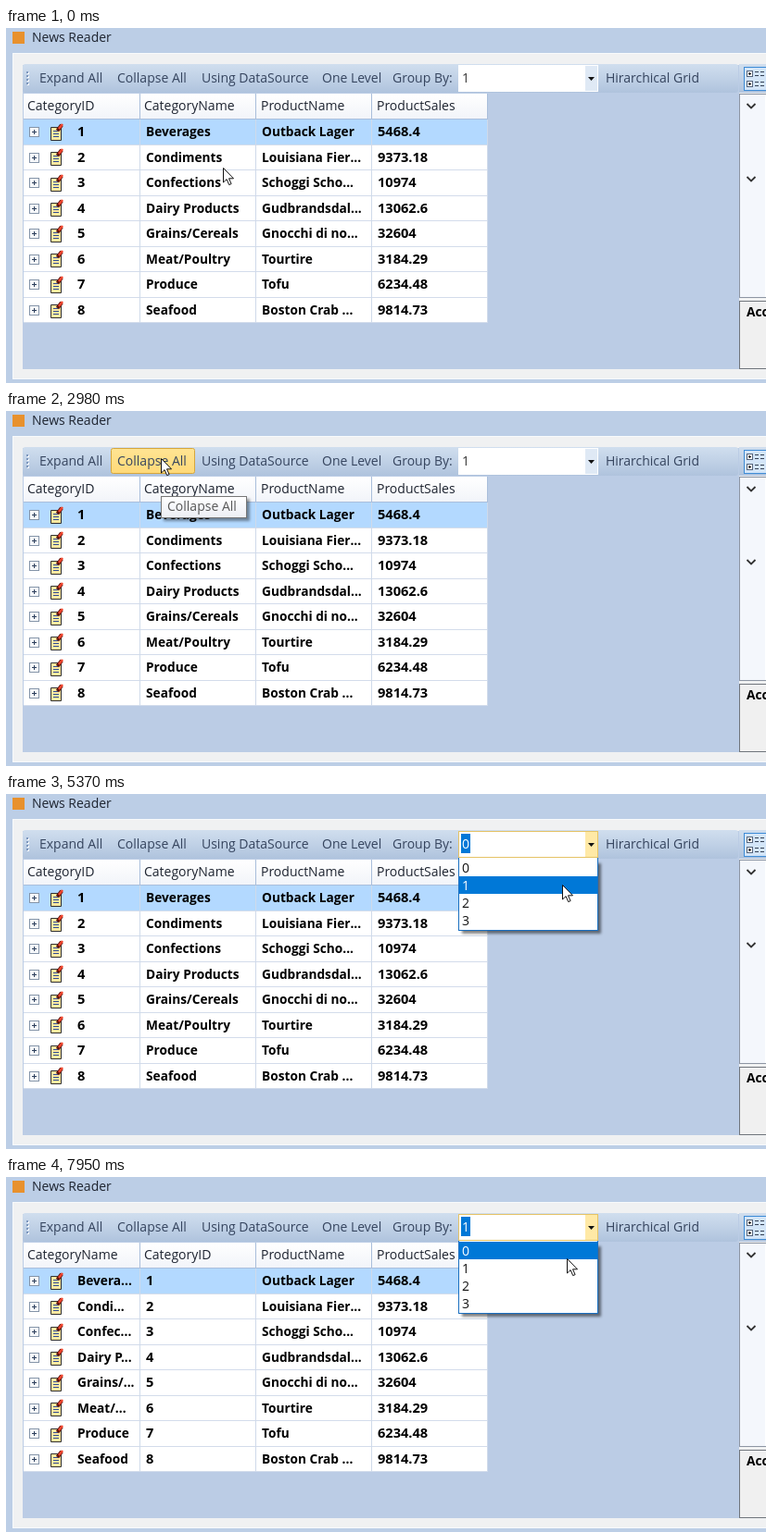
Animation of 820 by 384 pixels, one loop 8 s. Source, as an HTML page:

```html
<!DOCTYPE html>
<html lang="en">
<head>
<meta charset="utf-8">
<title>News Reader</title>
<style>
  html, body { margin: 0; width: 100%; height: 100%; overflow: hidden; background: #bccee6; }
  svg { display: block; }
  text { font: 14px "Open Sans", "Noto Sans", sans-serif; fill: #111; white-space: pre; }
  .tool { fill: #35445e; }
  .head { fill: #1e2430; }
  .bold { font-weight: 700; font-size: 13.7px; fill: #000; }
  .bold.num { font-size: 14.6px; }
  .num { font-size: 13.7px; }
  .tip { fill: #575757; }
  rect { shape-rendering: crispEdges; }
  .soft { shape-rendering: auto; }
</style>
</head>
<body>
<svg id="stage" width="820" height="384" viewBox="0 0 820 384">
  <defs>
    <linearGradient id="bar" x2="0" y2="1">
      <stop stop-color="#d0deee"/><stop offset=".5" stop-color="#c0d1e6"/><stop offset="1" stop-color="#afc3dd"/>
    </linearGradient>
    <linearGradient id="headFill" x2="0" y2="1">
      <stop stop-color="#fff"/><stop offset="1" stop-color="#f1f4f9"/>
    </linearGradient>
    <linearGradient id="hover" x2="0" y2="1">
      <stop stop-color="#fdf0bd"/><stop offset="1" stop-color="#fadf86"/>
    </linearGradient>
    <linearGradient id="pressed" x2="0" y2="1">
      <stop stop-color="#ffe493"/><stop offset="1" stop-color="#ffd978"/>
    </linearGradient>
    <linearGradient id="tipFill" x2="0" y2="1">
      <stop stop-color="#fff"/><stop offset="1" stop-color="#eceef4"/>
    </linearGradient>
    <filter id="blur" x="-10%" y="-50%" width="120%" height="200%"><feGaussianBlur stdDeviation="1.5"/></filter>
    <clipPath id="gridClip"><rect x="18" y="70" width="773" height="299"/></clipPath>
    <clipPath id="listClip"><rect x="480" y="69" width="180" height="90"/></clipPath>
    <g id="note">
      <path d="M2.5 5.5h11v14h-11z" fill="#ffe9a0" stroke="#2e2e2e"/>
      <path d="M5 9.5h5M5 12.5h6M5 15.5h6" stroke="#2f4d94"/>
      <path d="M9.5 9l4.5-6" stroke="#5c130b" stroke-width="4"/>
      <path d="M11 7l4-5" stroke="#f0452e" stroke-width="2.6"/>
    </g>
    <g id="noteGray">
      <path d="M2.5 5.5h11v14h-11z" fill="#f4f4f4" stroke="#2e2e2e"/>
      <path d="M5 9.5h5M5 12.5h6M5 15.5h6" stroke="#666"/>
      <path d="M9.5 9l4.5-6" stroke="#222" stroke-width="4"/>
      <path d="M11 7l4-5" stroke="#666" stroke-width="2"/>
    </g>
  </defs>
</svg>
<script>
const LOOP = 8000;
const ROW_H = 27.5;
const LIST_H = 80;
const stage = document.getElementById('stage');

const rect = (x, y, w, h, fill, more = '') =>
  `<rect x="${x}" y="${y}" width="${w}" height="${h}" fill="${fill}" ${more}/>`;
const frame = (x, y, w, h, fill, stroke, more = '') =>
  rect(x + .5, y + .5, w - 1, h - 1, fill, `stroke="${stroke}" ${more}`);
const text = (x, y, s, cls = '') => `<text x="${x}" y="${y}" class="${cls}">${s}</text>`;
const path = (d, stroke, width = 1, fill = 'none') =>
  `<path d="${d}" stroke="${stroke}" stroke-width="${width}" fill="${fill}"/>`;
const group = (id, body, more = '') => `<g id="${id}" ${more}>${body}</g>`;

// Toolbar buttons: label, text x, left and right edge
const buttons = [
  ['Expand All', 36, 29, 113],
  ['Collapse All', 120, 113, 204],
  ['Using DataSource', 211, 204, 334],
  ['One Level', 341, 334, 411],
  ['Hirarchical Grid', 647, 640, 757]
];

const products = [
  ['Beverages', 'Outback Lager', 5468.4, 'Bevera...'],
  ['Condiments', 'Louisiana Fier...', 9373.18, 'Condi...'],
  ['Confections', 'Schoggi Scho...', 10974, 'Confec...'],
  ['Dairy Products', 'Gudbrandsdal...', 13062.6, 'Dairy P...'],
  ['Grains/Cereals', 'Gnocchi di no...', 32604, 'Grains/...'],
  ['Meat/Poultry', 'Tourtire', 3184.29, 'Meat/...'],
  ['Produce', 'Tofu', 6234.48, 'Produce'],
  ['Seafood', 'Boston Crab ...', 9814.73, 'Seafood']
];

const drinks = [
  ['Outback Lager', 5468.4], ['Chai', 4887], ['Chang', 7038.55], ['Ipoh Coffee', 11069.9],
  ['Cte de Blaye', 49198.09], ['Florandine verte', 4475.7], ['Laughing Lum...', 910],
  ['Steeleye Stout', 5274.9], ['Waldru Kloster...', 4485.54], ['Lakkalikri', 7379.1]
];

function expander(cx, cy, open) {
  const x = cx - 5, y = Math.round(cy) - 5;
  const bar = `M${x + 3} ${y + 5.5}h5` + (open ? '' : `M${x + 5.5} ${y + 3}v5`);
  return frame(x, y, 11, 11, '#f8fafc', '#8494a8') + path(bar, '#2c3e5c');
}

// Each row: four cell texts, tree depth and expander state; depth 0 is bold
function table(id, heads, rows) {
  const n = rows.length;
  let s = rect(19, 98, 500, n * ROW_H + 1, '#fff') + rect(19, 99, 500, 27, '#b3d9ff');
  s += rect(19, 71, 500, 28, 'url(#headFill)');
  heads.forEach((h, i) => s += text([23, 149, 275, 400][i], 89, h, 'head'));
  rows.forEach(({ cells, depth, open }, i) => {
    const mid = 112.5 + i * ROW_H, base = Math.round(mid + 4.5), dx = depth * 25;
    const bold = depth === 0 ? 'bold' : '';
    s += rect(19, Math.round(98 + (i + 1) * ROW_H), 500, 1, '#d3dceb');
    if (depth < 5) s += expander(30 + dx, mid - .5, open);
    if (depth < 4) s += `<use href="#${bold ? 'note' : 'noteGray'}" x="${46 + dx}" y="${Math.round(mid) - 11}"/>`;
    cells.forEach((c, k) => {
      const cls = bold + (typeof c === 'number' ? ' num' : '');
      s += text(k ? [0, 151, 276, 401][k] : 77 + dx, base, c, cls);
    });
  });
  for (let x = 144; x < 520; x += 125) {
    s += rect(x, 71, 1, 28, '#a9bedb') + rect(x, 99, 1, n * ROW_H, '#cfdaea');
  }
  s += rect(19, 98, 500, 1, '#a9bedb');
  return group(id, s, 'clip-path="url(#gridClip)"');
}

function tooltip(id, x, y, w, label) {
  return group(id,
    rect(x + 3, y + 3, w, 24, '#000', 'class="soft" opacity=".4" filter="url(#blur)"') +
    frame(x, y, w, 24, 'url(#tipFill)', '#767676') + text(x + 7, y + 16, label, 'tip'));
}

function dropList() {
  let s = rect(492, 75, 150, 76, '#000', 'class="soft" opacity=".5" filter="url(#blur)"');
  s += frame(488, 68, 151, LIST_H, '#fff', '#1a6fc0');
  s += group('pick', rect(489, 0, 149, 19, '#0078d7'));
  for (let i = 0; i < 4; i++) s += `<text id="item${i}" x="492" y="${85 + i * 19}">${i}</text>`;
  return `<g clip-path="url(#listClip)">${group('list', s)}</g>`;
}

const chrome =
  rect(0, 0, 820, 384, '#bccee6') +
  rect(7, 4, 13, 13, '#e8912d') +
  text(28, 15, 'News Reader', 'head') +
  frame(7, 27, 830, 353, '#f0f1f2', '#f8fafc') +
  rect(18, 40, 773, 329, '#bbcce5') +
  rect(18, 39, 772, 31, 'url(#bar)', 'rx="3" class="soft"') +
  [47, 51, 55, 59].map(y => rect(23, y + 1, 2, 2, '#fff') + rect(22, y, 2, 2, '#7d97bd')).join('');

const side =
  rect(791, 39, 29, 31, 'url(#bar)') +
  frame(796, 42, 30, 26, '#d3e5f8', '#3d8bd6') +
  [46, 57].map(y => frame(799, y, 7, 7, '#fff', '#55657c') +
    path(`M801 ${y + 3.5}h3M802.5 ${y + 2}v3`, '#222') +
    path(`M808 ${y + 1.5}h4M814 ${y + 1.5}h4M808 ${y + 5.5}h4M814 ${y + 5.5}h4`, '#333f52')).join('') +
  frame(791, 71, 40, 221, '#f4f7fc', '#8d96a3') +
  [82, 161].map(y => path(`M799.5 ${y}l4.5 4.5 4.5-4.5`, '#333', 1.8)).join('') +
  rect(819, 72, 1, 219, '#fff') +
  frame(791, 295, 40, 74, '#f0f0f0', '#70757c') +
  text(799, 312, 'Acc', 'bold');

const scroll = group('scroll',
  `<rect id="track" x="771" y="71" width="19" height="298" fill="#f0f0f0"/>` +
  rect(771, 91, 19, 34, '#cdcdcd') +
  group('arrows', path('M776.5 84l4-4 4 4M776.5 356l4 4 4-4', '#444', 2)));

const combo =
  rect(488, 40, 151, 29, '#fff') +
  rect(625, 41, 13, 27, '#dfe9f5') +
  group('hot', frame(488, 40, 151, 29, '#fff', '#e5c365') + rect(625, 41, 13, 27, '#ffe9a6')) +
  path('M628 53h7l-3.5 4z', 'none', 0, '#111') +
  group('mark', rect(491, 43, 10, 21, '#0078d7')) +
  `<text id="value" x="492" y="59">1</text>`;

const byId = products.map(([c, p, v], i) => ({ cells: [i + 1, c, p, v], depth: 0 }));
const byName = products.map(([c, p, v, short], i) => ({ cells: [short, i + 1, p, v], depth: 0 }));
const tree = drinks.map(([p, v], i) => ({
  cells: [i < 3 ? 1 : '', 'Beverages', p, v], depth: Math.min(i, 5), open: true
}));
const names = ['CategoryID', 'CategoryName', 'ProductName', 'ProductSales'];
const swapped = [names[1], names[0], names[2], names[3]];

stage.insertAdjacentHTML('beforeend',
  chrome +
  group('glow', '<rect id="glowBox" class="soft" y="40.5" height="27" rx="2"/>') +
  buttons.map(([label, x]) => text(x, 59, label, 'tool')).join('') +
  text(417, 59, 'Group By:', 'tool') +
  table('byId', names, byId) + table('tree', names, tree) + table('byName', swapped, byName) +
  scroll + side + combo + dropList() +
  tooltip('tipExpand', 79, 93, 86, 'Expand All') +
  tooltip('tipCollapse', 167, 92, 93, 'Collapse All') +
  '<circle id="ring" r="15.5" fill="#ffe01e" opacity=".72"/>' +
  group('cursor', path('M.5 .5v15.5l3.6-3.4 2.6 6 2.4-1-2.6-5.8h5z', '#111', 1, '#fff')));

const $ = {};
stage.querySelectorAll('[id]').forEach(e => $[e.id] = e);
const show = (e, on) => e.style.display = on ? '' : 'none';
const within = (t, a, b) => t >= a && t < b;

// Pointer moves: first step, last step, step count, end x, end y
const moves = [
  [70, 410, 5, 78, 50],
  [1690, 2180, 8, 167, 51],
  [3730, 4490, 12, 632, 55],
  [5110, 5300, 4, 605, 93],
  [5370, 5440, 2, 595, 103],
  [6500, 7260, 12, 631, 55],
  [7610, 7950, 6, 605, 88]
];
const clicks = [[950, 1150], [2710, 2850], [4900, 5040], [5700, 5840], [7330, 7470]];

function pointer(t) {
  let x = 234, y = 151;
  for (const [from, to, n, ex, ey] of moves) {
    if (t < from) break;
    const step = Math.min(n, 1 + Math.floor((t - from) / ((to - from) / (n - 1)) + 1e-6));
    const p = step / n, k = p * p * (3 - 2 * p);
    x += (ex - x) * k;
    y += (ey - y) * k;
  }
  return [x, y];
}

// Visible height of the list while it rolls down
function listHeight(t) {
  const roll = age => age < 0 ? 0 : [7, 40, LIST_H][Math.min(2, Math.floor(age / 70))];
  if (within(t, 4970, 5770)) return roll(t - 4970);
  return roll(t - 7400);
}

function draw(t) {
  const [x, y] = pointer(t);
  $.cursor.setAttribute('transform', `translate(${Math.round(x)} ${Math.round(y)})`);
  $.ring.setAttribute('cx', x);
  $.ring.setAttribute('cy', y);
  show($.ring, clicks.some(([a, b]) => within(t, a, b)));

  const over = y >= 40 && y < 69 && buttons.find(b => x >= b[2] && x < b[3]);
  show($.glow, over);
  if (over) {
    const down = within(t, 950, 1690) || within(t, 2710, 3730);
    $.glowBox.setAttribute('x', over[2] + .5);
    $.glowBox.setAttribute('width', over[3] - over[2] - 1);
    $.glowBox.setAttribute('fill', `url(#${down ? 'pressed' : 'hover'})`);
    $.glowBox.setAttribute('stroke', down ? '#d6a63c' : '#ecd48c');
  }

  const open = within(t, 1360, 2910);
  show($.byId, !open && t < 5840);
  show($.tree, open);
  show($.byName, t >= 5840);
  show($.scroll, within(t, 1290, 2910));
  show($.arrows, open);
  $.track.setAttribute('height', open ? 298 : 276);

  show($.tipExpand, within(t, 610, 1690));
  show($.tipCollapse, within(t, 2380, 3730));

  const focused = t >= 4900;
  show($.hot, focused || (t > 3730 && x >= 488));
  show($.mark, focused);
  $.value.textContent = within(t, 4900, 5770) ? 0 : 1;
  $.value.style.fill = focused ? '#fff' : '#333';

  const h = listHeight(t);
  show($.list, h);
  $.list.setAttribute('transform', `translate(0 ${h - LIST_H})`);
  const hovered = y >= 70 ? Math.floor((y - 70) / 19) : t < 6000 ? 0 : 1;
  $.pick.setAttribute('transform', `translate(0 ${70 + hovered * 19})`);
  for (let i = 0; i < 4; i++) $['item' + i].style.fill = i === hovered ? '#fff' : '#111';
}

const start = performance.now();
function tick() {
  draw((performance.now() - start) % LOOP);
  requestAnimationFrame(tick);
}
tick();
</script>
</body>
</html>
```
